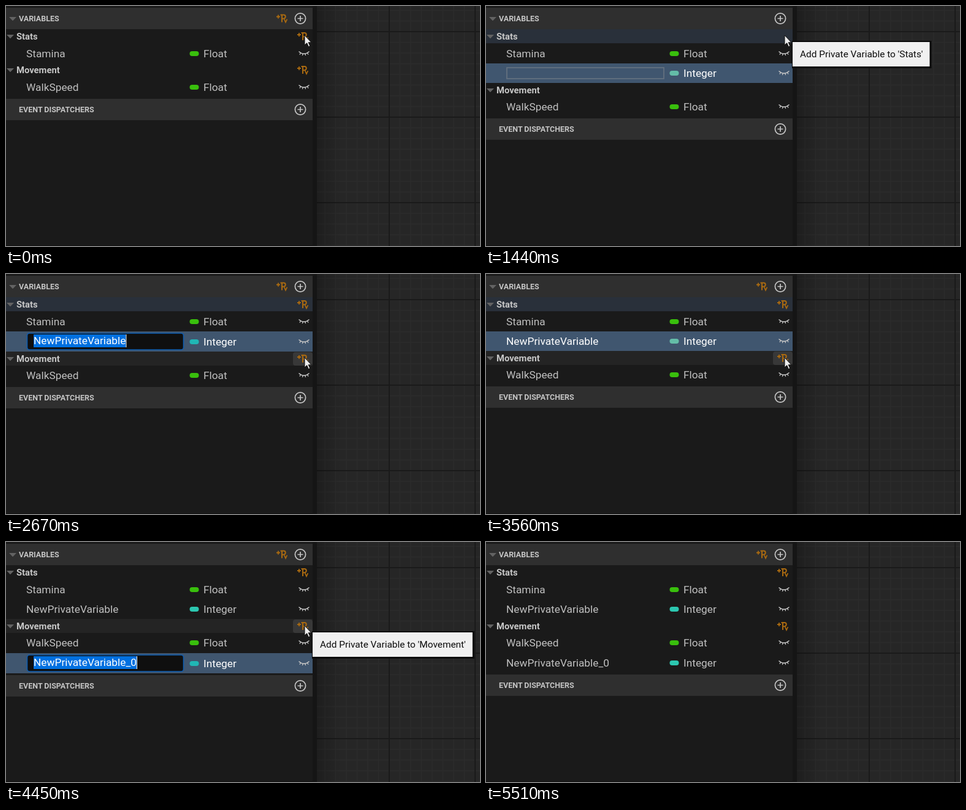
An HTML page for the animation above (6060 ms loop, 773 by 393 pixels).

```html
<!DOCTYPE html>
<html lang="en">
<head>
<meta charset="utf-8">
<title>Private variables</title>
<style>
  html, body { margin: 0; width: 100%; height: 100%; overflow: hidden; background: #1a1a1a; }
  svg { display: block; width: 773px; height: 393px; }
  text { font-family: Roboto, sans-serif; white-space: pre; }
  .head { font-size: 12.5px; font-weight: 700; fill: #c4c4c4; }
  .group { font-size: 14.8px; font-weight: 700; fill: #c6c6c6; }
  .item { font-size: 17.3px; fill: #c0c0c0; }
  .lit { fill: #fff; }
  .tip { font-size: 15.4px; fill: #0c0c0c; }
  .line { fill: none; stroke: #c4c4c4; }
  .private { fill: none; stroke: #aa6a10; stroke-width: 2; }
</style>
</head>
<body>
<svg viewBox="0 0 773 393">
  <defs>
    <pattern id="grid" x="484" y="-99" width="140" height="140" patternUnits="userSpaceOnUse">
      <rect width="140" height="140" fill="#262626"/>
      <path id="minor" stroke="#2b2b2b" stroke-width="1.4"/>
      <path d="M0 1H140M1 0V140" stroke="#1a1a1a" stroke-width="2"/>
    </pattern>
    <linearGradient id="shade">
      <stop stop-color="#000" stop-opacity=".22"/>
      <stop offset="1" stop-color="#000" stop-opacity="0"/>
    </linearGradient>
    <g id="add" class="line" stroke-width="1.7">
      <circle r="8.6"/>
      <path d="M-4.5 0H4.5M0-4.5V4.5"/>
    </g>
    <g id="private" class="private">
      <path d="M-9-3h6M-6-6v6" stroke-width="1.8"/>
      <path d="M0 6V-6H2.7a3.1 3.1 0 0 1 0 6.2H0M-2.5-6H0"/>
      <path d="M3.8 1.2l2.2 5 2.4-5" stroke-width="1.7"/>
    </g>
    <g id="eye" class="line" stroke-width="1.3">
      <path d="M-8.5-3.5Q0 4 8.5-3.5M-5.5-1l-1.6 2.7M-1.9.2l-.7 3M1.9.2l.7 3M5.5-1l1.6 2.7"/>
    </g>
    <path id="fold" d="M-6-3H6L0 3.3z" fill="#636363"/>
    <path id="arrow" d="M0 0V16l3.7-3.4 2.6 6 2.5-1.1-2.6-5.8H11z" fill="#eee" stroke="#111"/>
  </defs>
  <rect width="500" height="393" fill="#1a1a1a"/>
  <rect x="500" width="7" height="393" fill="#151515"/>
  <rect x="507" width="266" height="393" fill="url(#grid)"/>
  <rect x="507" width="40" height="393" fill="url(#shade)"/>
  <rect y="392" width="500" height="1" fill="#111"/>
  <g id="scene"></g>
</svg>
<script>
const LOOP = 6060, GROUP_H = 23, ITEM_H = 32.4, EDIT_H = 33.4;
const GREEN = '#39bf0d';
const scene = document.getElementById('scene');

document.getElementById('minor').setAttribute('d',
  Array.from({ length: 7 }, (_, i) => (i + 1) * 17.5 + 1)
    .map(p => `M0 ${p}H140M${p} 0V140`).join(''));

// Each step overrides part of the state before it.
// mode of a new variable: none, blank, edit, picked, done
const steps = [
  { at: 0, first: 'none', second: 'none', x: 487, y: 48, hover: false, tip: '', caret: false },
  { at: 450, hover: true, tip: 'Stats' },
  { at: 1440, first: 'blank', hover: false },
  { at: 1550, first: 'edit', hover: true, caret: true },
  { at: 1780, caret: false },
  { at: 2230, y: 56, tip: '' },
  { at: 2340, y: 82, caret: true },
  { at: 2450, y: 112 },
  { at: 2560, y: 131 },
  { at: 2670, y: 137 },
  { at: 2780, tip: 'Movement' },
  { at: 3230, caret: false },
  { at: 3560, first: 'picked', tip: '' },
  { at: 3670, first: 'done', second: 'blank', hover: false },
  { at: 3780, second: 'edit', hover: true, caret: true },
  { at: 3890, tip: 'Movement' },
  { at: 4000, caret: false },
  { at: 4450, caret: true },
  { at: 4550, y: 150, tip: '' },
  { at: 4660, x: 482, y: 190 },
  { at: 4770, x: 476, y: 235 },
  { at: 4880, x: 471, y: 275 },
  { at: 4980, x: 468, y: 295, caret: false },
  { at: 5090, x: 467, y: 293, second: 'done' },
  { at: 5300, x: 462, y: 325 },
  { at: 5400, x: 457, y: 351 },
  { at: 5510, x: -50 },
];
steps.forEach((step, i) => { steps[i] = { ...steps[i - 1], ...step }; });

const use = (id, x, y) => `<use href="#${id}" x="${x}" y="${y}"/>`;
const text = (cls, x, y, label) => `<text class="${cls}" x="${x}" y="${y}">${label}</text>`;
const rect = (x, y, w, h, fill, more = '') =>
  `<rect x="${x}" y="${y}" width="${w}" height="${h}" fill="${fill}" ${more}/>`;

const ruler = document.createElement('canvas').getContext('2d');
function widthOf(label, size) {
  ruler.font = `${size}px Roboto, sans-serif`;
  return ruler.measureText(label).width;
}

function header(y, label) {
  return rect(0, y, 500, 35, '#2f2f2f') + text('head', 21, y + 22, label) + use('add', 480, y + 17.5);
}

function editor(top, name, caret) {
  const w = widthOf(name, 17.3);
  return rect(34.5, top + 3, 255, 27, '#0f0f0f', 'rx="4" stroke="#0d5cb0" stroke-width="1.6"') +
    rect(45, top + 5, w, 21, '#0070e0') +
    (caret ? rect(45 + w, top + 5, 1, 21, '#fff') : '') +
    text('item lit', 45, top + 21, name);
}

function group(top, label, s, hovered, holdsPick, icons) {
  const mid = Math.round(top + GROUP_H / 2);
  const fill = hovered ? '#242424' : holdsPick ? '#29303a' : '';
  return (fill ? rect(0, Math.round(top), 500, GROUP_H, fill) : '') +
    (hovered ? rect(468, Math.round(top) + 1, 32, 22, '#383838', 'rx="4"') : '') +
    use('fold', 7, mid) + text('group', 17, mid + 5, label) +
    (icons ? use('private', 484, mid) : '');
}

function item(top, name, mode, s, hovered) {
  const editing = mode === 'edit', picked = editing || mode === 'blank' || mode === 'picked';
  const edge = Math.round(top), h = editing ? EDIT_H : ITEM_H;
  const mid = Math.round(top + h / 2 + (editing ? .3 : 0));
  const isFloat = mode === 'float';
  const pill = isFloat ? GREEN : editing ? '#20b6b5' : picked ? '#64bda8' : '#2cc7b0';
  const cls = picked ? 'item lit' : 'item';
  let out = picked ? rect(0, edge, 500, Math.round(top + h) - edge, '#40566f')
    : hovered ? rect(0, edge, 500, 33, '#242424') : '';
  if (editing) out += editor(edge, name, s.caret);
  else if (mode === 'blank') out += rect(34, mid - 9, 256, 18, 'none', 'stroke="#63717f" stroke-width="1.8"');
  else out += text(cls, 33, mid + 6, name);
  return out + rect(299.5, mid - 4, 15, 8, pill, 'rx="4"') +
    text(cls, 322, mid + 6, isFloat ? 'Float' : 'Integer') + use('eye', 486, mid);
}

function tooltip(s) {
  const label = `Add Private Variable to '${s.tip}'`, y = s.y + 9;
  const w = widthOf(label, 15.4) + 25;
  return rect(499, y, w + 2, 45, '#0a0a0a') + rect(500, y + 2, w - 2, 40, '#f0f0f0') +
    text('tip', 512, y + 27, label);
}

function draw(s) {
  const icons = s.first !== 'blank' && s.second !== 'blank';
  const pick = mode => ['blank', 'edit', 'picked'].includes(mode);
  const rows = [
    ['group', 'Stats', pick(s.first)],
    ['item', 'Stamina', 'float'],
    ['item', 'NewPrivateVariable', s.first],
    ['group', 'Movement', pick(s.second)],
    ['item', 'WalkSpeed', 'float'],
    ['item', 'NewPrivateVariable_0', s.second],
  ];
  let out = header(3, 'VARIABLES') + use('fold', 11, 21) + (icons ? use('private', 450, 20.5) : '');
  let top = 38.3;
  for (const [kind, label, mode] of rows) {
    if (mode === 'none') continue;
    const h = kind === 'group' ? GROUP_H : mode === 'edit' ? EDIT_H : ITEM_H;
    const hovered = s.hover && s.x > 0 && s.y >= top && s.y < top + h;
    out += kind === 'group' ? group(top, label, s, hovered, mode, icons)
      : item(top, label, mode, s, hovered);
    top += h;
  }
  out += header(Math.round(top + 2.8), 'EVENT DISPATCHERS');
  if (s.tip) out += tooltip(s);
  if (s.x > 0) out += use('arrow', s.x, s.y);
  scene.innerHTML = out;
}

let shown = null;
const start = performance.now();
function tick() {
  const t = (performance.now() - start) % LOOP;
  const now = steps.filter(s => s.at <= t).pop();
  if (now !== shown) draw(shown = now);
  requestAnimationFrame(tick);
}
tick();
</script>
</body>
</html>
```
